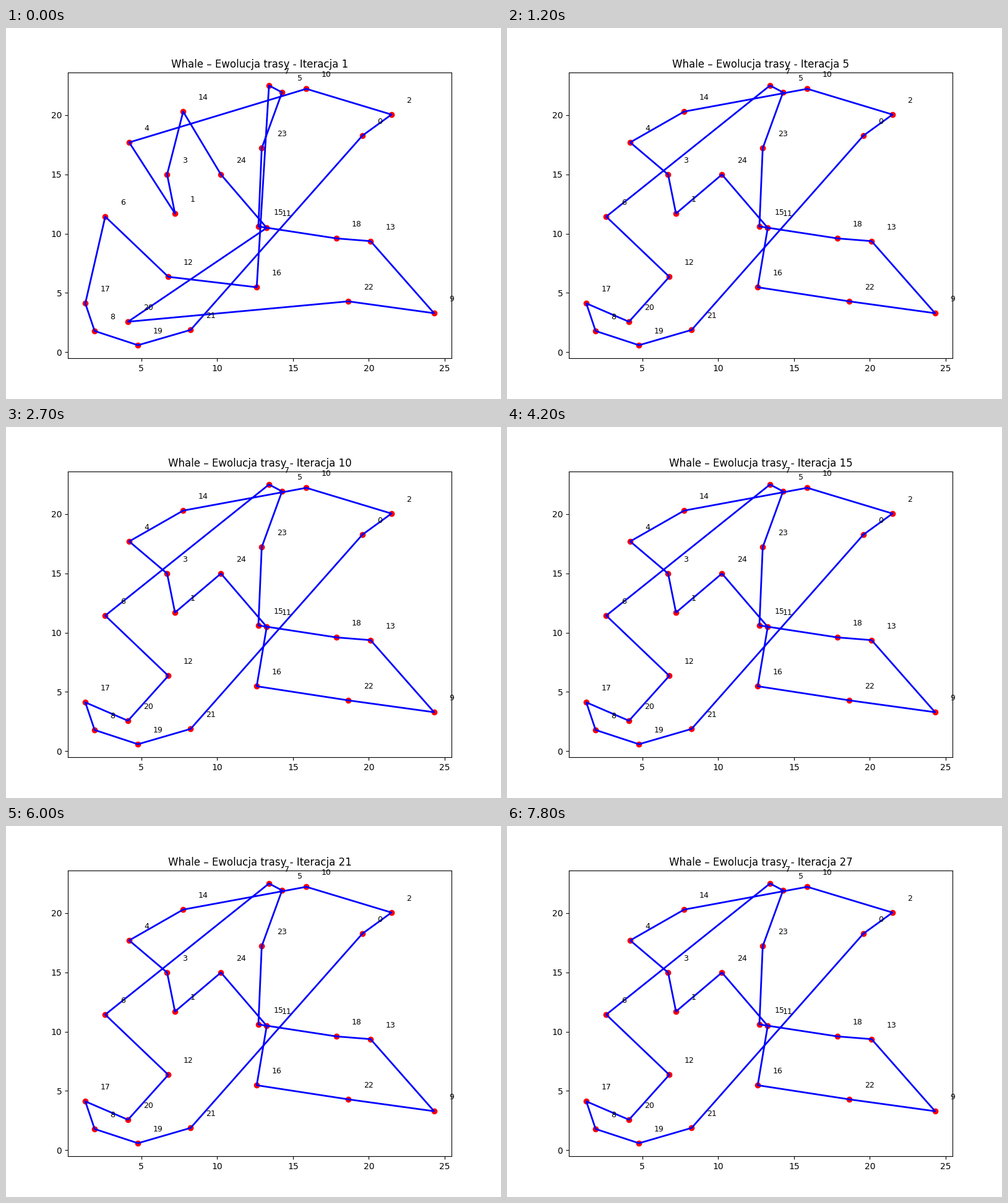
Animation of 800x600 px, one loop 8000 ms. Source, as a matplotlib script:

```python
import matplotlib.pyplot as plt
import numpy as np
from matplotlib.animation import FuncAnimation

TICK_MS = 100
LOOP_MS = 8000
ITERATION_MS = 300

CITIES = np.array([
    (19.58, 18.27), (7.22, 11.70), (21.50, 20.05), (6.70, 14.99), (4.20, 17.70),
    (14.28, 21.92), (2.62, 11.44), (13.42, 22.50), (1.92, 1.79), (24.306, 3.29),
    (15.88, 22.22), (13.27, 10.49), (6.78, 6.36), (20.12, 9.37), (7.76, 20.30),
    (12.72, 10.61), (12.61, 5.48), (1.306, 4.12), (17.87, 9.60), (4.78, 0.59),
    (4.12, 2.57), (8.25, 1.88), (18.65, 4.29), (12.94, 17.21), (10.25, 14.99),
])

# Stretches of the tour that stay the same while the route improves.
SOUTH = [0, 21, 19, 8, 17]
EAST = [7, 5, 23, 15, 18, 13, 9, 22]
CENTRE = [16, 11, 24, 1, 3]
NORTH = [10, 2]

# First iteration at which each tour is the best one.
TOURS = {
    1: SOUTH + [6, 12, 16] + EAST + [20, 11, 24, 14, 3, 1, 4] + NORTH,
    2: SOUTH + [6, 20, 12] + EAST + CENTRE + [14, 4] + NORTH,
    3: SOUTH + [6, 20, 12] + EAST + CENTRE + [4, 14] + NORTH,
    4: SOUTH + [20, 12, 6] + EAST + CENTRE + [4, 14] + NORTH,
}

plt.rcParams["font.family"] = "DejaVu Sans"
fig, ax = plt.subplots(figsize=(8, 6), dpi=100)
ax.scatter(*CITIES.T, c="red")
for number, (x, y) in enumerate(CITIES):
    ax.text(x + 1, y + 1, str(number), fontsize=9)
route, = ax.plot(*CITIES.T, "b-", linewidth=2)
title = ax.set_title("")


def draw(frame):
    iteration = frame * TICK_MS // ITERATION_MS + 1
    tour = TOURS[min(iteration, max(TOURS))]
    route.set_data(*CITIES[tour + tour[:1]].T)
    title.set_text(f"Whale – Ewolucja trasy - Iteracja {iteration}")
    return route, title


anim = FuncAnimation(fig, draw, frames=LOOP_MS // TICK_MS, interval=TICK_MS,
                     repeat=True, repeat_delay=0)
plt.show()
```
